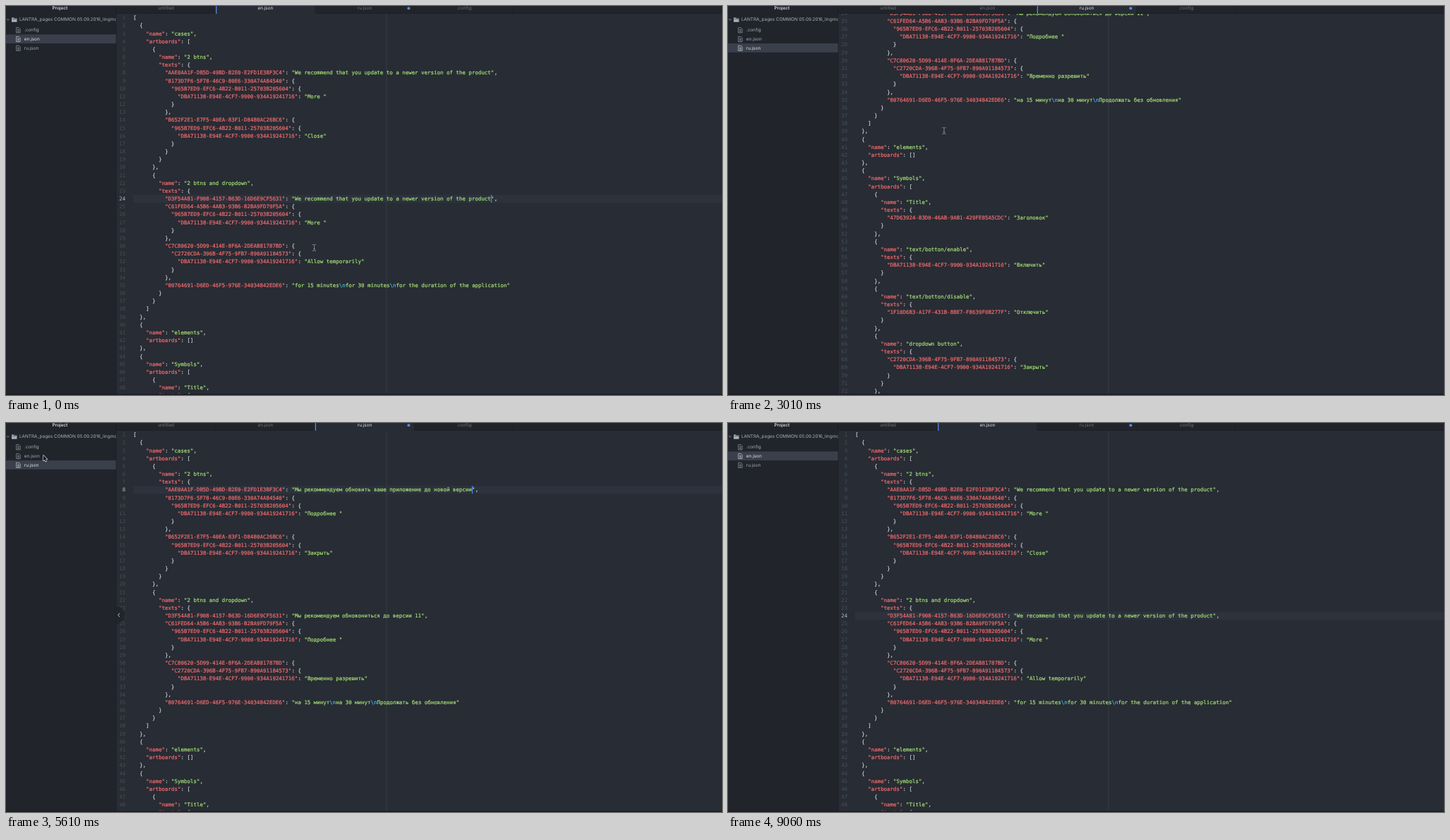
Write an HTML page with a canvas that moves like this. It is 1014x552 px and loops after 9510 ms.

```html
<!DOCTYPE html>
<html lang="en">
<head>
<meta charset="utf-8">
<title>Editor</title>
<style>
  html, body { margin: 0; width: 100%; height: 100%; overflow: hidden; background: #282c34; }
  canvas { display: block; }
</style>
</head>
<body>
<canvas id="stage" width="1014" height="552"></canvas>
<script>
const ctx = document.getElementById('stage').getContext('2d');
const W = 1014, H = 552, LOOP = 9510;
const SIDE = 156, TOP = 11, BOTTOM = 550.5;
const CODE_X = 180.3, LINE_H = 11.17, CODE_SIZE = 7.447, CHAR_W = CODE_SIZE * 0.60205;
const CODE_FONT = `${CODE_SIZE}px "DejaVu Sans Mono", monospace`;
const UI_FONT = '6.4px Inter, sans-serif';
const UI_BOLD = '600 6.4px Inter, sans-serif';
const color = {
  editor: '#282c34', panel: '#21252b', border: '#191c21', row: '#3a3f4b', line: '#2d323d',
  guide: '#3b4049', number: '#484e5a', numberOn: '#b4bac6', key: '#f46c70', string: '#a3e077',
  escape: '#45b8ee', punct: '#cdd2dc', text: '#a6adba', textOn: '#e4e7ec', tab: '#6d737f', accent: '#568af2'
};

// Document contents in both languages
function makeDocument(pick) {
  const label = text => ({ 'DBA71138-E94E-4CF7-9900-934A19241716': text });
  const button = text => ({ '965B7ED9-EFC6-4B22-B011-25703B205604': label(text) });
  const dropdown = text => ({ 'C2720CDA-396B-4F75-9FB7-890A91184573': label(text) });
  const board = (name, texts) => ({ name, texts });
  const advice = 'We recommend that you update to a newer version of the product';
  const more = pick('More ', 'Подробнее ');
  const close = pick('Close', 'Закрыть');
  return [
    { name: 'cases', artboards: [
      board('2 btns', {
        'AAE0AA1F-DB5D-49BD-B2E0-E2FD1E3BF3C4': pick(advice, 'Мы рекоммендуем обновить ваше приложение до новой версии'),
        '8173D7F6-5F78-46C9-80E6-330A74A84540': button(more),
        'B652F2E1-E7F5-40EA-83F1-D8480AC26BC6': button(close)
      }),
      board('2 btns and dropdown', {
        'D3F54A81-F908-4157-B63D-16D6E9CF5631': pick(advice, 'Мы рекомендуем обновониться до версии 11'),
        'C61FED64-A5B6-4AB3-93B6-B2BA9FD79F5A': button(more),
        'C7C80620-5D99-414E-8F6A-2DEAB81787BD': dropdown(pick('Allow temporarily', 'Временно разрешить')),
        '80764691-D6ED-46F5-976E-34034842EDE6': pick(
          'for 15 minutes\nfor 30 minutes\nfor the duration of the application',
          'на 15 минут\nна 30 минут\nПродолжать без обновления')
      })
    ] },
    { name: 'elements', artboards: [] },
    { name: 'Symbols', artboards: [
      board('Title', { '47D63924-B3D0-46AB-9AB1-429FE85A5CDC': pick('Title', 'Заголовок') }),
      board('text/botton/enable', label(pick('Enable', 'Включить'))),
      board('text/botton/disable', { '1F10D6B3-A17F-431B-8BE7-F8639F0B277F': pick('Disable', 'Отключить') }),
      board('dropdown button', dropdown(close)),
      board('text/title', label(pick('Title', 'Заголовок')))
    ] }
  ];
}

function tokenize(line) {
  const tokens = [];
  for (const m of line.matchAll(/"[^"]*"|[^\s"]+/g)) {
    const isString = m[0][0] === '"';
    const isKey = isString && line[m.index + m[0].length] === ':';
    let col = m.index;
    for (const part of m[0].split(/(\\n)/)) {
      const fill = part === '\\n' ? color.escape : isKey ? color.key : isString ? color.string : color.punct;
      tokens.push({ part, col, fill });
      col += part.length;
    }
  }
  return tokens;
}
const makeLines = pick => JSON.stringify(makeDocument(pick), null, 2).split('\n').map(tokenize);
const files = {
  en: { lines: makeLines((en, ru) => en), caretLine: 24, caretCol: 113, tab: 1 },
  ru: { lines: makeLines((en, ru) => ru), caretLine: 8, caretCol: 107, tab: 2 }
};

const ticks = [0, 150, 510, 660, 990, 1320, 1480, 1640, 1910, 2060, 2210, 2360, 2530, 2680, 3010, 3340,
  3670, 3990, 4230, 4530, 4830, 5130, 5370, 5610, 6060, 6360, 6510, 6780, 6930, 7080, 7260, 7560, 7710,
  7860, 8010, 8160, 8460];
const mousePath = [[0, 436.5, 343], [150, 418.5, 336], [510, 240, 170], [660, 76, 110], [990, 47, 62],
  [1320, 44, 58], [1910, 44, 58], [2060, 70, 75], [2360, 306, 177], [3340, 306, 177], [3990, 304.5, 178],
  [4530, 304.5, 178], [4830, 138, 125], [5130, 62, 48], [5610, 53, 46], [6510, 53, 46], [6780, 80, 75],
  [7260, 352, 310], [7560, 400, 420], [7710, 430, 530], [7860, 440, 580]];
const scrollPath = [[2360, 0], [2530, 80], [2680, 170], [3010, 263.3], [3340, 330], [3670, 330],
  [3990, 150], [4230, 20.3], [4530, 0]];
const caretOff = [[150, 510], [990, 1320], [1910, 2210], [4830, 5130], [5370, 5610], [6060, 6360],
  [6780, 7080], [7260, 7560], [7860, 8160], [8460, LOOP]];
const toggleOn = [[990, 2060], [5130, 6930]];

const within = (ranges, t) => ranges.some(([a, b]) => t >= a && t < b);

function along(path, t) {
  const i = path.findIndex(p => p[0] > t);
  if (i === 0) return path[0].slice(1);
  if (i < 0) return path[path.length - 1].slice(1);
  const a = path[i - 1], b = path[i], k = (t - a[0]) / (b[0] - a[0]);
  return a.slice(1).map((v, n) => v + (b[n + 1] - v) * k);
}

function rect(x, y, w, h, fill) {
  ctx.fillStyle = fill;
  ctx.fillRect(x, y, w, h);
}

function text(str, x, y, fill, align = 'left') {
  ctx.textAlign = align;
  ctx.fillStyle = fill;
  ctx.fillText(str, x, y);
}

function stroke(path, style, width = 0.8) {
  ctx.strokeStyle = style;
  ctx.lineWidth = width;
  ctx.stroke(new Path2D(path));
}

function clipped(x, y, w, h, draw) {
  ctx.save();
  ctx.beginPath();
  ctx.rect(x, y, w, h);
  ctx.clip();
  draw();
  ctx.restore();
}

function drawCode(file, scroll, caretVisible) {
  const lineTop = n => TOP + (n - 1) * LINE_H - scroll;
  const caretY = lineTop(file.caretLine);
  rect(CODE_X - 0.3, caretY, W, LINE_H, color.line);
  rect(538.6, TOP, 0.8, H, color.guide);
  ctx.font = CODE_FONT;
  file.lines.forEach((tokens, i) => {
    const y = lineTop(i + 1) + 8.2;
    if (y < 0 || y > H + 10) return;
    text(i + 1, 169.3, y, i + 1 === file.caretLine ? color.numberOn : color.number, 'right');
    for (const { part, col, fill } of tokens) {
      const x = CODE_X + col * CHAR_W;
      text(part, x, y, fill);
      ctx.strokeStyle = fill;
      ctx.lineWidth = 0.2;
      ctx.strokeText(part, x, y);
    }
  });
  if (caretVisible) rect(CODE_X + file.caretCol * CHAR_W - 0.2, caretY, 1.1, LINE_H, '#528bff');
}

function drawTabs(active) {
  const width = 140.6;
  rect(SIDE, 0, W, TOP, color.panel);
  rect(SIDE, TOP - 0.5, W, 0.5, color.border);
  ctx.font = UI_FONT;
  ['untitled', 'en.json', 'ru.json', '.config'].forEach((name, i) => {
    const x = SIDE + 0.5 + i * width, on = i === active;
    rect(x + width - 0.4, 0, 0.5, TOP, color.border);
    if (on) {
      rect(x, 0, width, TOP, color.editor);
      rect(x, 0, 1.3, TOP, color.accent);
    }
    text(name, x + width / 2, 5.3, on ? color.textOn : color.tab, 'center');
  });
  ctx.fillStyle = color.accent;
  ctx.beginPath();
  ctx.arc(570.3, 3.2, 2, 0, 7);
  ctx.fill();
}

function drawSidebar(selected) {
  rect(0, 0, SIDE, H, color.panel);
  rect(SIDE - 0.3, 0, 0.6, H, color.border);
  ctx.font = UI_BOLD;
  text('Project', 76.3, 5.3, '#d5d9e0', 'center');
  ctx.font = UI_FONT;
  stroke('M1.2 18.5l1.6 1.6 1.6-1.6', color.text);
  ctx.fillStyle = color.text;
  ctx.fill(new Path2D('M8 16.5h3l.8 1h3.7v5.3H8z'));
  rect(8.6, 18.2, 6.3, 0.5, color.panel);
  clipped(0, 0, SIDE, H, () => text('LANTRA_pages COMMON 05.09.2016_lingmora', 19, 21.4, color.text));
  ['.config', 'en.json', 'ru.json'].forEach((name, i) => {
    const y = 34 + i * 12.75, on = i === selected;
    if (on) rect(0, y - 6.4, SIDE - 0.3, 12.75, color.row);
    const fill = on ? color.textOn : color.text;
    stroke(`M14.6 ${y - 3.3}h3.6l2 2v5.2h-5.6z M16 ${y - 0.6}h2.8 M16 ${y + 0.9}h2.8 M16 ${y + 2.4}h2.8`, fill, 0.6);
    text(name, 25.8, y + 2.3, fill);
  });
}

function drawToggle() {
  clipped(SIDE, 0, 40, H, () => {
    ctx.fillStyle = color.panel;
    ctx.beginPath();
    ctx.arc(SIDE, 272.3, 12.2, 0, 7);
    ctx.fill();
    stroke('M161 269.9l-2.4 2.6 2.4 2.6', '#d5d9e0', 0.9);
  });
}

function drawMouse([x, y]) {
  ctx.save();
  ctx.translate(x, y);
  if (x > SIDE) {
    stroke('M-2.6-4.6Q0-4.6 0-3.2Q0-4.6 2.6-4.6M0-3.4V3.4M-2.6 4.6Q0 4.6 0 3.2Q0 4.6 2.6 4.6M-1.3 1.8H1.3', '#8b909a', 0.9);
  } else {
    const arrow = 'M0 0V7.4L1.7 5.9L2.9 8.6L4.2 8L3 5.4H5.3Z';
    stroke(arrow, '#e8eaee', 1.3);
    ctx.fillStyle = '#0c0d0f';
    ctx.fill(new Path2D(arrow));
  }
  ctx.restore();
}

function render(now) {
  const time = now % LOOP;
  const t = ticks.filter(tick => tick <= time).pop() ?? 0;
  const file = t >= 1480 && t < 6360 ? files.ru : files.en;
  const selected = t >= 1320 && t < 6060 ? 2 : 1;

  rect(0, 0, W, H, color.editor);
  clipped(SIDE, TOP, W - SIDE, BOTTOM - TOP, () =>
    drawCode(file, along(scrollPath, t)[0], !within(caretOff, t)));
  drawTabs(file.tab);
  drawSidebar(selected);
  rect(0, BOTTOM, W, H - BOTTOM, color.border);
  if (within(toggleOn, t)) drawToggle();
  drawMouse(along(mousePath, t));
}

ctx.textRendering = 'geometricPrecision';
ctx.lineJoin = 'round';
const start = performance.now();
(function loop() {
  render(performance.now() - start);
  requestAnimationFrame(loop);
})();
</script>
</body>
</html>
```
